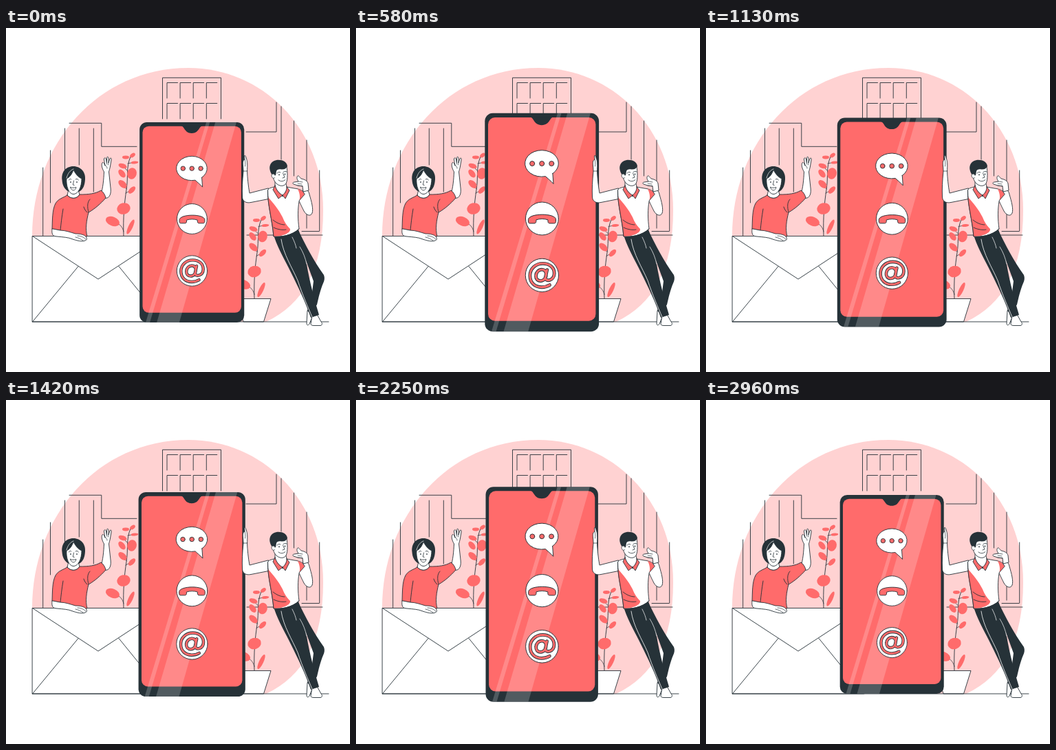
Animation, 500 px wide and 500 px high, one loop 3 s. Source, as an HTML page with a canvas:

```html
<!DOCTYPE html>
<html lang="en">
<head>
<meta charset="utf-8">
<title>Contact</title>
<style>
html, body { margin: 0; width: 100%; height: 100%; overflow: hidden; background: #fff; }
canvas { display: block; width: 500px; height: 500px; }
</style>
</head>
<body>
<canvas id="stage" width="500" height="500"></canvas>
<script>
const ctx = document.getElementById('stage').getContext('2d');
const DARK = '#263238', CORAL = '#ff6b6b', PINK = '#ffd2d2', WHITE = '#fff';
const LOOP = 3000, PHASE = LOOP / 72;
ctx.lineCap = ctx.lineJoin = 'round';

const cache = {};
const path = d => cache[d] || (cache[d] = new Path2D(d));

function fill(d, color) {
  ctx.fillStyle = color;
  ctx.fill(path(d));
}

function line(d, width = 0.9, color = DARK) {
  ctx.lineWidth = width;
  ctx.strokeStyle = color;
  ctx.stroke(path(d));
}

function shape(d, color, width = 0.9) {
  fill(d, color);
  line(d, width);
}

function oval(x, y, rx, ry, deg, color, outline) {
  ctx.beginPath();
  ctx.ellipse(x, y, rx, ry, deg * Math.PI / 180, 0, Math.PI * 2);
  ctx.fillStyle = color;
  ctx.fill();
  if (outline) {
    ctx.lineWidth = 0.9;
    ctx.strokeStyle = DARK;
    ctx.stroke();
  }
}

function roundBox(x, y, w, h, r, color) {
  ctx.beginPath();
  ctx.roundRect(x, y, w, h, r);
  ctx.fillStyle = color;
  ctx.fill();
}

function room() {
  fill('M38 302C38 168 134 58 265 58C372 58 461 145 461 265C461 350 432 402 378 427H40Z', PINK);
  // centre window
  line('M227.5 132V72.3H312.5V132');
  for (const y of [79.5, 109.5]) {
    for (let i = 0; i < 4; i++) {
      const x = 234 + i * 19.1;
      line(`M${x} ${y + 22.5}V${y}H${x + 15.5}`);
    }
  }
  // walls
  line('M92 138.3H138.8V172.3H190M349 151H393V108');
  line('M53.7 203V302M64.5 178V254M85.5 146V226M106.3 146V199M127.3 146V238');
  line('M400 114V191M418.5 135V215M437 163V291M455.7 207V295');
  line('M350 301H390M430 295.5H455M428 301H460');
}

// x, y, rx, ry, angle
const leaves = [
  [183, 211.5, 6.8, 8.3, 15], [171, 262.5, 9.8, 8.2, -15], [155, 281, 10.5, 6.6, 22],
  [181, 289, 3.2, 11.5, 25], [169.5, 227, 7.3, 4.4, 42], [183, 235.5, 6.5, 3.4, -45],
  [168.5, 211.5, 4, 6.8, -38], [169.5, 200.5, 6.2, 3.4, 20], [174, 188, 5, 2.4, 0],
  [184, 185, 4.3, 2.6, -35], [187, 195.5, 5.2, 1.9, -5]
];

function plant(dx, dy) {
  ctx.save();
  ctx.translate(dx, dy);
  line('M171 303C170 275 172 255 175 235C178 217 174 203 181 187');
  line('M155 281C163 283 169 287 171 296M168 226L175 234M174 240L183 235M169 200L176 207M177 197L187 195', 0.7);
  for (const leaf of leaves) oval(...leaf, CORAL);
  ctx.restore();
}

function envelope() {
  shape('M38.5 302.5H229.5V427H38.5Z', WHITE);
  line('M38.5 302.5L134 365L229.5 302.5M38.5 427L105 346.5M229.5 427L164 346.5');
}

function woman() {
  // raised forearm and hand
  shape('M138 241C141 233 142 220 142.5 209C140 205 138 199 140 196C141 194 143 197 144 200L142.5 191C142.5 188 145 188 145.5 191L146.5 196L146.5 189C147 186 149 187 149 190L149 196L151 190C152 188 153.5 189 153 192L151.5 201C151 204 150 207 149.5 209L152.2 234C153 243 149 249 143 247Z', WHITE);
  line('M144 200C146 200 147 202 147 204M146.5 196V198M149 196L148.5 199', 0.7);
  // hair, neck, top
  fill('M81.5 221C80 207 89 201 98 201C109 201 116 210 115 220C114.5 229 112 235 106 238H91C85 234 82 229 81.5 221Z', DARK);
  shape('M91 235L89 243C94 249 103 249 107 242L104.5 234Z', WHITE);
  shape('M89 243C83 247 76 248 72 255C67 264 67.5 281 67 292.5L79 294L80 303H118C115 292 117 280 120 268C129 263 138 255 145 247C144 242 141 238 138 236C130 241 120 242 107 242C103 249 94 249 89 243Z', CORAL);
  line('M79 294C80 284 81 275 83 263M120 268C118 260 118 253 122 249M118 268C115 265 114 263 113 260');
  // resting arm
  shape('M67 292C66 300 68 303 74 303C83 304 90 304 97 307C103 309 110 311 115 309C118 308 118 306 116 303C113 300 107 299 101 299C94 297 86 294 79 294Z', WHITE);
  line('M104 302C109 302 113 304 116 307M101 304C106 305 109 307 112 309', 0.7);
  // face
  shape('M88 219C93 217 96 212 98 206C101 212 105 217 110 219C110 231 105 241.5 98 241.5C91.5 241.5 87 230 88 219Z', WHITE);
  line('M98 205C93 207 90 211 88 218', 0.7, WHITE);
  line('M91.5 221C92 219 94 219 95 220M101 220C102 219 104 219 105.5 221M98.5 222L97.3 228L99.2 228.5', 0.8);
  oval(94, 224, 0.8, 1.1, 0, DARK);
  oval(103, 224, 0.8, 1.1, 0, DARK);
  shape('M93.5 231.5C96 232.5 99 232.5 102 231.5C101 237 95.5 238 93.5 231.5Z', WHITE, 0.8);
}

function pot() {
  shape('M335 393.5H385L374.5 427H345.5Z', WHITE);
}

function icons() {
  shape('M284.5 217.8L285.5 231.5C282 227.5 278 224.5 275 221.6A22.2 17.5 0 1 1 284.5 217.8Z', WHITE);
  for (const x of [257.4, 270.2, 283]) oval(x, 204.7, 3.2, 3.2, 0, CORAL, true);

  oval(270.4, 277.5, 21.8, 21.8, 0, WHITE, true);
  shape('M252.2 278.5C253 270 288 270 288.7 278.5V281.5C288.7 283.2 287.5 283.8 286 283.8H281C279 283.8 278.2 283 278.2 281V279.2C274 277.5 267 277.5 262.6 279.2V281C262.6 283 261.5 283.8 260 283.8H254.5C252.8 283.8 252.2 283 252.2 281.5Z', CORAL);

  oval(270.4, 352.5, 22, 22, 0, WHITE, true);
  const at = 'M277 345.5L274.8 355.5C274.4 361.5 286.4 360.5 286.6 350C286.6 342 280 337 271.5 337C261.5 337 254.4 344 254.4 353C254.4 362.5 261 368.3 270 368.3C274 368.3 277.5 367.3 280.5 365.5M275.8 351.5C275.8 356.5 272.5 360 268.5 360C264.3 360 262 357 262.3 353C262.5 348.5 266 345 270 345C273.8 345 275.8 347.5 275.8 351.5Z';
  line(at, 4.4);
  line(at, 2.7, CORAL);
}

function phone(scale) {
  ctx.save();
  ctx.translate(270.2, 282.5);
  ctx.scale(scale, scale);
  ctx.translate(-270.2, -282.5);
  roundBox(194.7, 138, 151, 289, 10.5, DARK);
  roundBox(199, 143.7, 142.4, 269.2, 9, CORAL);
  fill('M254 143C260 143.5 259 153.8 270 153.8C281 153.8 280 143.5 286 143Z', DARK);
  ctx.save();
  ctx.beginPath();
  ctx.roundRect(194.7, 138, 151, 289, 10.5);
  ctx.clip();
  const shine = 'rgba(255,255,255,0.2)';
  fill('M291 138H296L209.5 427H203.5Z', shine);
  fill('M304 138H334.5L252 427H219.5Z', shine);
  ctx.restore();
  icons();
  ctx.restore();
}

function man() {
  // shoes
  shape('M438 411L437 429C437 432 439 433 441 430L446 418Z', WHITE);
  shape('M445 418L443 430C443 432 445 432.5 448 432.5H457C460 432 460 429 458 427L453 418Z', WHITE);
  // legs
  fill('M425 294C435 315 447 338 462 359C463.5 363 463 367 461 371C457 380 454 393 452 402L444 414L438 411L444.5 388L447 368L436 338L410 312Z', DARK);
  fill('M390 304L425 293C430 308 434 325 437 343C441 368 449 397 455 417L443 421C436 400 424 375 415 357C406 338 396 322 390 304Z', DARK);
  line('M400 307C403 329 416 348 424 367C431 388 439 406 445 420', 0.8, WHITE);
  line('M416 304C419 310 421 315 422 320M427 318C432 326 435 334 437 343', 0.7, WHITE);

  // arm leaning on the phone
  shape('M381 233L354 240C352 229 351 218 350.5 208C351 201 351 194 349.5 190C348.5 186 347 184 346.5 186L347 191C344.5 192 344 195 344.5 200L345 208C343.5 222 343 234 343.5 246C344 252 349 255 356 253.5L384 248Z', WHITE);
  line('M345 208H350.5M347 191C348 194 348 198 347.5 201', 0.7);

  // shirt
  shape('M390 231C385 232 381 233 380.5 236C380 257 387 278 389 303C400 304 415 302 426 292C424 278 424 263 426 252L434 242C432 236 427 234 419 233L408 231Z', WHITE);
  fill('M381 246C388 254 396 263 402 275C405 283 409 288 413 292C414 298 402 303 389 303C388 282 381 265 381 246Z', CORAL);
  fill('M424 234C428 235 432 237 434 242L426 252C428 246 427 240 424 234Z', CORAL);
  line('M380.5 236C380 257 387 278 389 303C400 304 415 302 426 292M388 279C393 283 399 286 405 286M389 290C395 293 402 294 407 293');

  // bent arm and hand
  shape('M431 236C436 233 440 236 441 242C444 252 447 263 445 269C443 274 437 273 433 266C430 260 427 254 426 251L434 242Z', WHITE);
  shape('M424 229L418 227C416 226 417 224 419 224L425 223C423 220 422 217 424 215C425 214 427 217 429 219C434 220 438 222 439 226L440 236L432 238L431 230Z', WHITE);
  line('M425 223L431 224M424 226L430 227M424 229L431 230', 0.7);

  // neck, collar, head
  shape('M391 223L391 233L402 245L409 234L406 223Z', WHITE);
  shape('M391 229L388 235L396 248L402 243C396 240 393 235 391 229Z', CORAL);
  shape('M408 231L412 236L406 248L402 243C406 240 408 236 408 231Z', CORAL);
  shape('M387 206C387 216 389 222 393 226C397 230 404 231 407 226C410 220 409 209 408 201L396 199Z', WHITE);
  fill('M388 215.5C384 210 382 204 384 199C386 194 391 191.8 396 191.8C403 191.8 408 195 409 200.5C408 204 405 206 400 205.5C396 205 394 206 393 208L392 214Z', DARK);
  shape('M390.5 213C387.5 210.5 385 213 386.5 216.5C387.5 218.5 389.5 219 390.5 217.5', WHITE, 0.8);
  line('M394 211C396 209 398 209 399 210M403 209.5C405 208 407 208 408 209M402.5 211L405 217L402 218M396 221C399 223.5 403 223.5 406 220.5', 0.8);
  oval(397, 213.3, 0.8, 1.1, 0, DARK);
  oval(405.5, 212.6, 0.8, 1.1, 0, DARK);
}

// two uneven beats per loop
const beats = [[0, 1], [0.2, 1.1], [0.6, 1], [0.8, 1.1], [1, 1]];

function beat(p) {
  const i = beats.findIndex(([at]) => at > p);
  const [a, from] = beats[i - 1], [b, to] = beats[i];
  return from + (to - from) * (p - a) / (b - a);
}

function draw(now) {
  ctx.fillStyle = WHITE;
  ctx.fillRect(0, 0, 500, 500);
  room();
  plant(0, 0);
  plant(190, 91.5);
  envelope();
  woman();
  pot();
  line('M38.5 427H469');
  phone(beat(((now + PHASE) % LOOP) / LOOP));
  man();
}

function tick() {
  draw(performance.now());
  requestAnimationFrame(tick);
}
tick();
</script>
</body>
</html>
```
